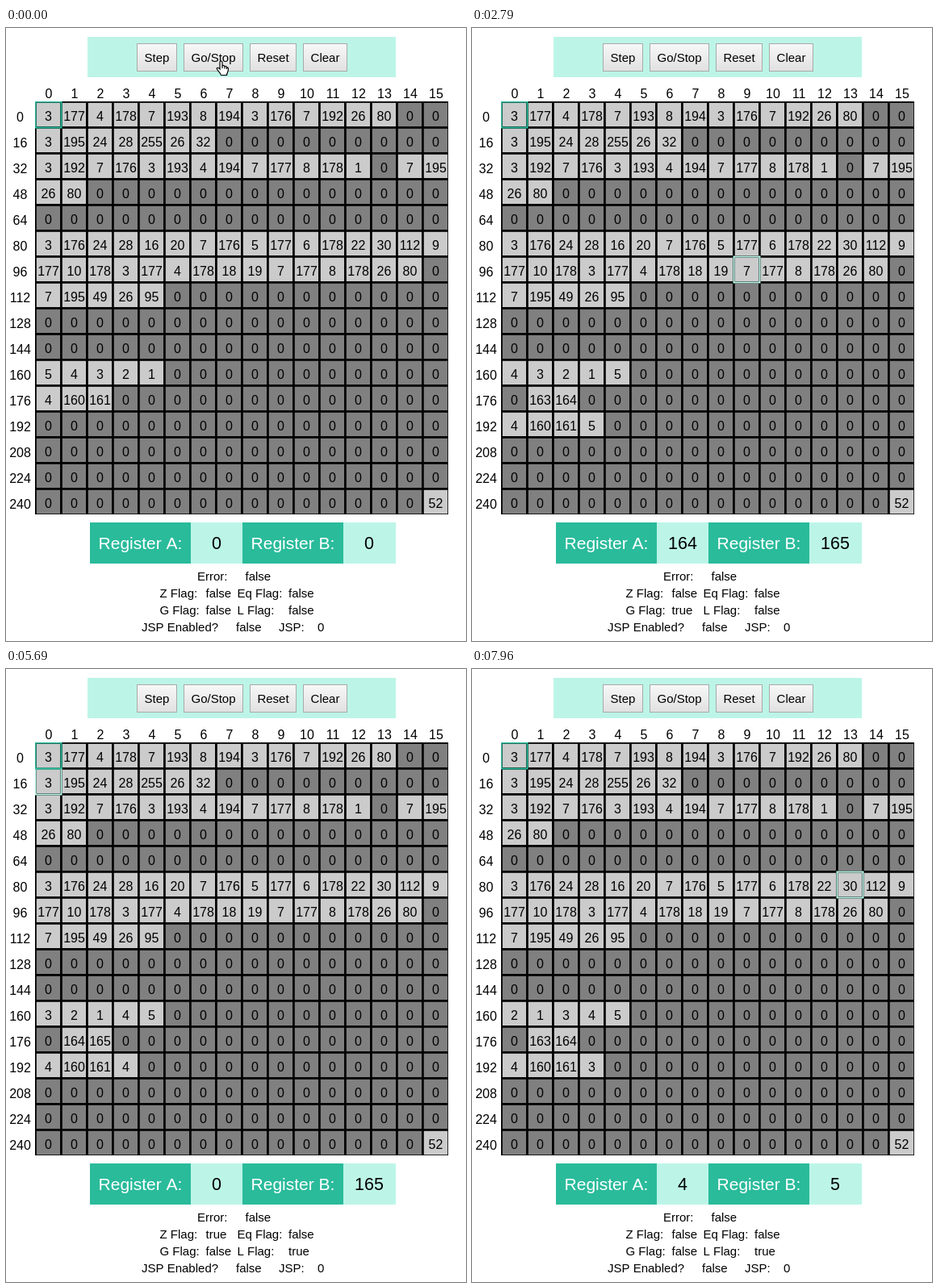
An HTML page with a canvas that plays this animation: 570x760 px, repeating every 8000 ms.

```html
<!DOCTYPE html>
<html>
<head>
<meta charset="utf-8">
<title>Bubble sort on an 8-bit machine</title>
<style>
  html, body { margin: 0; width: 100%; height: 100%; overflow: hidden; background: #fff; }
  canvas { display: block; width: 570px; height: 760px; }
</style>
</head>
<body>
<canvas id="stage" width="570" height="760"></canvas>
<script>
const g = document.getElementById('stage').getContext('2d');
const LOOP = 8000, START = 329.3, TICK = 16.1;
const TEAL = '#2abb9b', MINT = '#bcf5e7';

// Memory blocks by start address
const blocks = {
  0: [3,177, 4,178, 7,193, 8,194, 3,176, 7,192, 26,80],
  16: [3,195, 24, 28,255, 26,32],
  32: [3,192, 7,176, 3,193, 4,194, 7,177, 8,178, 1,0, 7,195, 26,80],
  80: [3,176, 24, 28,16, 20, 7,176, 5,177, 6,178, 22, 30,112, 9,177,
       10,178, 3,177, 4,178, 18, 19, 7,177, 8,178, 26,80],
  112: [7,195, 49, 26,95],
  160: [5,4,3,2,1],
  176: [4,160,161],
  255: [52]
};

// Screen refreshes: [number of even steps, time reached]
const pace = [[1,290],[11,1040],[1,1100],[1,1190],[1,1250],[10,1900],[1,1950],[10,2730],
  [1,2790],[1,2870],[11,3580],[1,3670],[11,4470],[1,4520],[1,4580],[1,4640],[11,5270],
  [1,5330],[5,5690],[1,5750],[5,6120],[1,6210],[3,6380],[1,6470],[8,6990],[1,7050],
  [12,7840],[1,7900],[1,7960]];
const refresh = [0];
for (const [n, end] of pace) {
  const from = refresh[refresh.length - 1];
  for (let i = 1; i <= n; i++) refresh.push(Math.round((from + (end - from) * i / n) / 10) * 10);
}

// Instructions with an operand byte, then those without
const withArg = {
  1: (m, x) => { m.a = x; },
  3: (m, x) => { m.a = m.mem[x]; },
  4: (m, x) => { m.b = m.mem[x]; },
  5: (m, x) => { m.a = m.mem[m.mem[x]]; },
  6: (m, x) => { m.b = m.mem[m.mem[x]]; },
  7: (m, x) => { m.mem[x] = m.a; },
  8: (m, x) => { m.mem[x] = m.b; },
  9: (m, x) => { m.mem[m.mem[x]] = m.a; },
  10: (m, x) => { m.mem[m.mem[x]] = m.b; },
  26: (m, x) => { m.pc = x; },
  28: (m, x) => { if (m.z) m.pc = x; },
  30: (m, x) => { if (m.gt) m.pc = x; }
};
const plain = {
  18: m => { m.a++; },
  19: m => { m.b++; },
  20: m => { m.a--; },
  22: m => { m.eq = m.a === m.b; m.gt = m.a > m.b; m.lt = m.a < m.b; },
  24: m => { m.z = m.a === 0; },
  49: m => { [m.a, m.b] = [m.b, m.a]; }
};

// One byte is read per tick
function run(ticks) {
  const m = { mem: new Array(256).fill(0), a: 0, b: 0, pc: 0,
              z: false, eq: false, gt: false, lt: false };
  for (const at in blocks) blocks[at].forEach((v, i) => { m.mem[+at + i] = v; });
  let op = null;
  while (ticks-- > 0) {
    const byte = m.mem[m.pc++];
    if (op) { op(m, byte); op = null; }
    else if (withArg[byte]) op = withArg[byte];
    else if (plain[byte]) plain[byte](m);
  }
  return m;
}

function box(x, y, w, h, fill) {
  g.fillStyle = fill;
  g.fillRect(x, y, w, h);
}

function text(s, x, y, size, align = 'center', fill = '#000') {
  g.font = size + 'px "Liberation Sans", Arial, sans-serif';
  g.textAlign = align;
  g.fillStyle = fill;
  g.fillText(s, x, y);
}

function button(label, x, w, pressed) {
  const shade = g.createLinearGradient(0, 19, 0, 54);
  shade.addColorStop(0, pressed ? '#d4d4d4' : '#f8f8f8');
  shade.addColorStop(1, pressed ? '#ececec' : '#e0e0e0');
  box(x, 19, w, 35, shade);
  g.strokeStyle = '#a9a9a9';
  g.lineWidth = 1;
  g.strokeRect(x + .5, 19.5, w - 1, 34);
  text(label, x + w / 2, 42, 15);
}

function outline(cell, color, width) {
  g.strokeStyle = color;
  g.lineWidth = width;
  g.strokeRect(36.5 + cell % 16 * 32, 91.5 + (cell >> 4) * 32, 32, 32);
}

function drawMemory(m) {
  for (let i = 0; i < 16; i++) {
    text(i, 53 + i * 32, 87, 16);
    text(i * 16, 17.5, 116 + i * 32, 16);
  }
  g.save();
  g.beginPath();
  g.rect(36, 91, 512, 512);
  g.clip();
  m.mem.forEach((v, i) => {
    const x = 36.5 + i % 16 * 32, y = 91.5 + (i >> 4) * 32;
    box(x, y, 32, 32, v ? '#cbcbcb' : '#808080');
    outline(i, '#000', 2.6);
    text(v, x + 16, y + 23, 16);
  });
  if (m.pc) outline(m.pc, MINT, 2);
  outline(0, TEAL, 2);
  g.restore();
}

function drawRegisters(m) {
  [['A', m.a, 104], ['B', m.b, 293]].forEach(([name, value, x]) => {
    box(x, 613, 125, 51, TEAL);
    box(x + 125, 613, x === 104 ? 64 : 65, 51, MINT);
    text('Register ' + name + ':', x + 62.5, 646, 21, 'center', '#fff');
    text(value, x + 157, 646, 21.5);
  });
}

function drawStatus(m) {
  const put = (s, x, y) => text(String(s), x, y, 15, 'left');
  put('Error:', 237, 685);
  put(false, 296.5, 685);
  [['Z Flag:', m.z, 'Eq Flag:', m.eq], ['G Flag:', m.gt, 'L Flag:', m.lt]].forEach((row, i) =>
    row.forEach((s, k) => put(s, [190.5, 247.5, 286.5, 350][k], 706 + i * 21)));
  put('JSP Enabled?', 168, 748);
  put(false, 285, 748);
  put('JSP:', 338, 748);
  put(0, 386, 748);
}

const hand = new Path2D('M5 11V2.5C5 .5 8 .5 8 2.5V7C9 6 11 6.5 11 8C12 7 13.500 7.500 13.500 9' +
  'C15 8.500 15.500 9.500 15.500 11C15.500 14 14 15 13.500 18.500H6.500C6 16 3 13.500 1.500 11' +
  'C.5 9 3 8.500 5 11ZM8 7V10M11 8V10.500M13.500 9V11');
function drawHand(x, y) {
  g.save();
  g.translate(x, y);
  g.fillStyle = '#fff';
  g.fill(hand);
  g.strokeStyle = '#000';
  g.lineWidth = 1.2;
  g.stroke(hand);
  g.restore();
}

function draw(now) {
  const t = now % LOOP;
  const shown = refresh.filter(s => s <= t).pop();
  const m = run(Math.floor((shown - START) / TICK));
  box(0, 0, 570, 760, '#fff');
  box(101, 11, 382, 50, MINT);
  button('Step', 162, 50);
  button('Go/Stop', 220, 74, shown >= 290 && shown < 400);
  button('Reset', 302, 58);
  button('Clear', 368, 55);
  drawMemory(m);
  drawRegisters(m);
  drawStatus(m);
  if (shown < 480) drawHand(260, 40);
}

const begin = performance.now();
function loop() {
  draw(performance.now() - begin);
  requestAnimationFrame(loop);
}
loop();
</script>
</body>
</html>
```
